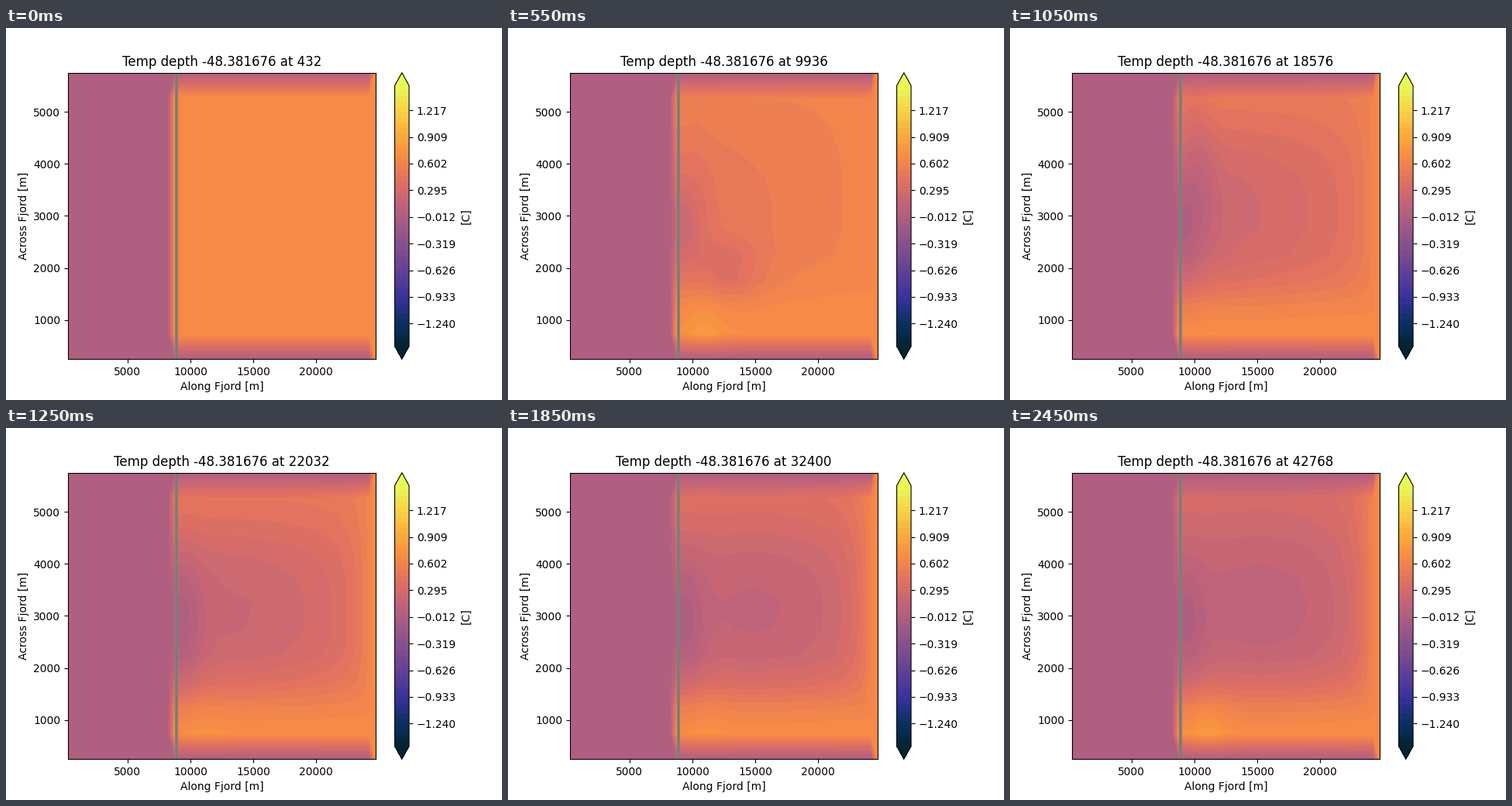
Write a matplotlib script that moves like this. It is 640 by 480 pixels and loops after 2500 ms.

```python
import numpy as np
import matplotlib.pyplot as plt
from matplotlib.animation import FuncAnimation
from matplotlib.colors import LinearSegmentedColormap

FRAMES, INTERVAL = 50, 50
WARM = 0.704

thermal = LinearSegmentedColormap.from_list("thermal", (
    "#032333 #0d3064 #35329b #5d3e99 #7e4d8f #9e5987 "
    "#c16479 #e17161 #f68b45 #fbad3c #f6d346 #e7fa5a").split())
LEVELS = np.linspace(-1.5, 1.5, 50)

# Cell centres in kilometres
x = np.arange(0.25, 25, 0.5)
y = np.arange(0.25, 6, 0.5)
X, Y = np.meshgrid(x, y)


def bell(u, centre, width):
    return np.exp(-((u - centre) / width) ** 2)


def pool(cx, cy, w, h):
    return bell(X, cx, w) * bell(Y, cy, h)


def temperature(i):
    s = i / (FRAMES - 1)
    onset = 1 - np.exp(-i / 5)

    # The interior cools from the ice face outwards
    lag = 13 + 0.6 * (X - 9)
    core = 0.21 + (WARM - 0.21) * bell(i, 0, lag)
    north = WARM - 0.38 * s ** 0.8
    t = core + (north - core) * bell(Y, 5.5, 1.1)
    t += (WARM - core) * bell(Y, 0.75, 0.9)

    # Slow gyre, cold plume at the face, warm pool to the south
    t -= 0.1 * s * pool(15.3, 3.2, 6, 1.6)
    spread = 0.5 + 0.8 * min(1, i / 25)
    t -= 0.29 * onset * (1 - 0.35 * s) * pool(9.3, 2.8, 1.6, spread)
    pulse = 0.07 + 0.06 * np.cos(2 * np.pi * (i - 12) / 19)
    t += onset * pulse * pool(11, 0.9, 1.6, 0.5)

    # Passing cold tongues: first south-east, then along the north
    t -= 0.2 * bell(i, 11, 4) * pool(13, 1.95, 2.6, 0.5)
    streak = bell(X, 10 + 0.6 * (5.25 - Y), 1.2) * bell(Y, 4.2, 1.7)
    t -= 0.25 * bell(i, 17, 4) * streak

    # Warm inflow from the open boundary
    t += np.maximum(0.6 - t, 0) * np.exp(-np.abs(24.25 - X) / 1.3)
    t[:, x < 8.5] = 0
    t[[0, -1]] = 0
    t[:, -1] = WARM
    return t


fig, ax = plt.subplots(figsize=(6.4, 4.8), dpi=100)


def draw_field(i):
    return ax.contourf(x * 1000, y * 1000, temperature(i), levels=LEVELS,
                       cmap=thermal, extend="both")


contours = draw_field(0)
bar = fig.colorbar(contours, ax=ax, label="[C]")
ticks = -0.0119 + 0.30711 * np.arange(-4, 5)
bar.set_ticks(ticks, labels=[f"{t:.3f}".replace("-", "\u2212") for t in ticks])
bar.minorticks_off()

# Ice face
for color, width in (("#8a7f78", 2.88), ("#6f8078", 1.44)):
    ax.axvline(8894, color=color, lw=width, solid_capstyle="butt")

ax.set_xlim(250, 24750)
ax.set_ylim(250, 5750)
ax.set_xlabel("Along Fjord [m]")
ax.set_ylabel("Across Fjord [m]")
title = ax.set_title("")


def update(i):
    global contours
    contours.remove()
    contours = draw_field(i)
    title.set_text(f"Temp depth -48.381676 at {432 + 864 * i}")
    return contours, title


anim = FuncAnimation(fig, update, frames=FRAMES, interval=INTERVAL,
                     repeat=True, repeat_delay=0, blit=False)
plt.show()
```
